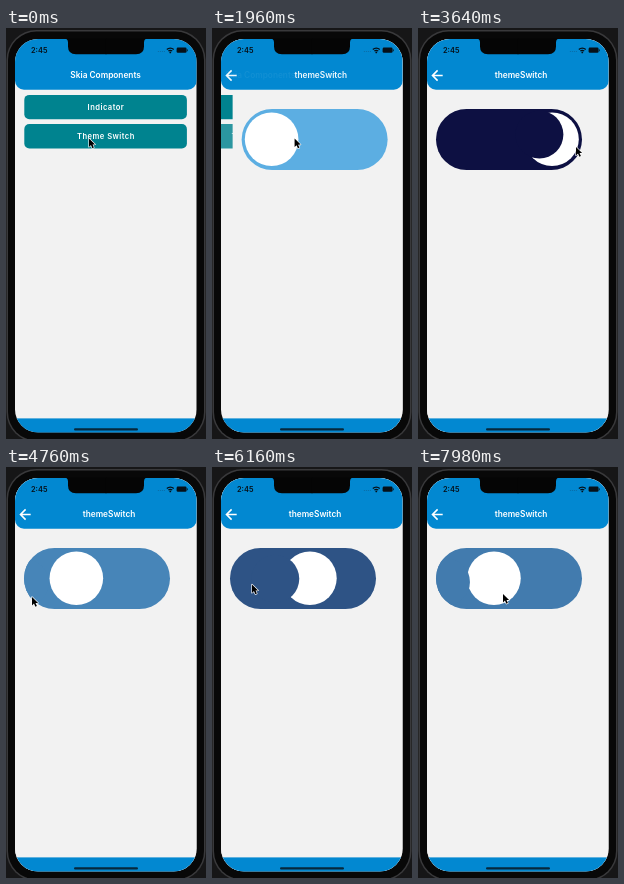
Write an HTML page with a canvas that moves like this. It is 200 by 411 pixels and loops after 8000 ms.

```html
<!DOCTYPE html>
<html lang="en">
<head>
<meta charset="utf-8">
<title>Theme switch</title>
<style>
html, body { margin: 0; width: 100%; height: 100%; overflow: hidden; background: #161617; }
canvas { display: block; width: 200px; height: 411px; }
</style>
</head>
<body>
<canvas id="stage"></canvas>
<script>
const W = 200, H = 411, LOOP = 8000, STEP = 140, GLIDE = 800;
const BLUE = '#0288d1', TEAL = '#00838f', PAGE = '#f2f2f2', INK = '#061018';
const FONT = 'Inter, "Liberation Sans", sans-serif';
const screen = { x: 9, y: 11, w: 181.7, h: 393.5, r: 23 };
const track = { x: 18, y: 81, w: 146, h: 61 };
const thumb = { left: 48, right: 134, y: 111.2, r: 26.8 };

// Times at which the switch is flipped, and pointer moves as [start, dx, dy]
const flips = [2222, 4227, 5717, 7485];
const moves = [[1800, -4, 0.5], [2700, 79, 8], [3780, -132, 11], [5300, 14, -12.5], [6900, 45, 9.5]];

const canvas = document.getElementById('stage');
const ctx = canvas.getContext('2d');
const dpr = window.devicePixelRatio || 1;
canvas.width = W * dpr;
canvas.height = H * dpr;

const clamp01 = v => Math.min(1, Math.max(0, v));

function glide(t, start) {
  const p = clamp01((t - start) / GLIDE);
  return p * p * (3 - 2 * p);
}

function thumbX(t) {
  const p = flips.reduce((sum, start, i) => sum + (i % 2 ? -1 : 1) * glide(t, start), 0);
  return thumb.left + (thumb.right - thumb.left) * p;
}

function pointerAt(t) {
  return moves.reduce(([x, y], [start, dx, dy]) => {
    const p = glide(t, start);
    return [x + dx * p, y + dy * p];
  }, [83, 110.5]);
}

const pressAlpha = t => 1 - 0.5 * Math.sin(Math.PI * clamp01((t - 1340) / 700));

function trackColor(x) {
  const d = thumb.right - x;
  return `rgb(${13 + 0.913 * d},${16 + 1.843 * d},${66 + 1.858 * d})`;
}

function box(x, y, w, h, r, fill) {
  ctx.beginPath();
  ctx.roundRect(x, y, w, h, r);
  ctx.fillStyle = fill;
  ctx.fill();
}

function disc(x, y, r, fill) {
  ctx.beginPath();
  ctx.arc(x, y, r, 0, Math.PI * 2);
  ctx.fillStyle = fill;
  ctx.fill();
}

function clipBox(x, y, w, h, r) {
  ctx.beginPath();
  ctx.roundRect(x, y, w, h, r);
  ctx.clip();
}

function label(text, x, y, size, color, spacing = 0) {
  ctx.font = `600 ${size}px ${FONT}`;
  ctx.letterSpacing = spacing + 'px';
  ctx.textAlign = 'center';
  ctx.fillStyle = color;
  ctx.fillText(text, x + spacing / 2, y);
}

function button(text, y, alpha) {
  ctx.globalAlpha = alpha;
  box(18.3, y, 162.6, 24.3, 5, TEAL);
  label(text, 99.7, y + 15, 7.6, '#fff', 0.45);
  ctx.globalAlpha = 1;
}

function themeSwitch(x) {
  const { x: tx, y: ty, w, h } = track;
  const color = trackColor(x), d = x - 76;
  box(tx, ty, w, h, h / 2, color);
  ctx.save();
  clipBox(tx, ty, w, h, h / 2);
  disc(x, thumb.y, thumb.r, '#fff');
  // The shadow disc slides in over the thumb to carve the crescent
  disc(28 + 1.61 * d, 115 - 0.145 * d, 24, color);
  ctx.restore();
}

function backArrow(x, y, size) {
  ctx.strokeStyle = '#fff';
  ctx.lineWidth = 1.6;
  ctx.beginPath();
  ctx.moveTo(x + 2 * size, y);
  ctx.lineTo(x, y);
  ctx.moveTo(x + size, y - size);
  ctx.lineTo(x, y);
  ctx.lineTo(x + size, y + size);
  ctx.stroke();
}

function phone() {
  ctx.fillStyle = '#161617';
  ctx.fillRect(0, 0, W, H);
  box(0.5, 2, 199, 412, 30, '#39393b');
  box(2, 3.5, 196, 409, 28.5, '#080808');
}

function notch() {
  ctx.fillStyle = '#050505';
  for (const side of [-1, 1]) {
    ctx.save();
    ctx.translate(100, 10.5);
    ctx.scale(side, 1);
    ctx.beginPath();
    ctx.moveTo(-0.5, 0);
    ctx.lineTo(42, 0);
    ctx.quadraticCurveTo(38, 0, 38, 4);
    ctx.lineTo(38, 8);
    ctx.quadraticCurveTo(38, 15.7, 30, 15.7);
    ctx.lineTo(-0.5, 15.7);
    ctx.fill();
    ctx.restore();
  }
}

function statusBar() {
  label('2:45', 33.2, 25, 7.4, INK);
  for (let i = 0; i < 4; i++) disc(152.3 + i * 2, 23.5, 0.5, '#0b6599');
  ctx.strokeStyle = INK;
  ctx.lineWidth = 1.3;
  for (const r of [2.7, 4.9]) {
    ctx.beginPath();
    ctx.arc(164.3, 25, r, Math.PI * 1.25, Math.PI * 1.75);
    ctx.stroke();
  }
  disc(164.3, 24.4, 0.9, INK);
  box(170.6, 19.6, 10, 5.2, 1.3, INK);
  box(181, 21.3, 0.7, 1.9, 0.3, INK);
}

function pointer(x, y) {
  ctx.save();
  ctx.translate(x, y);
  ctx.scale(0.86, 0.86);
  ctx.beginPath();
  [[0, 0], [0, 9.8], [2.3, 7.7], [3.9, 11.4], [5.7, 10.6], [4.1, 7.1], [7.1, 7]]
    .forEach(([px, py]) => ctx.lineTo(px, py));
  ctx.closePath();
  ctx.lineJoin = 'round';
  ctx.lineWidth = 1.4;
  ctx.strokeStyle = '#fff';
  ctx.stroke();
  ctx.fillStyle = '#000';
  ctx.fill();
  ctx.restore();
}

function pages(t, slide) {
  const { x, y, w, h } = screen;
  ctx.fillStyle = PAGE;
  ctx.fillRect(x, y, w, h);
  if (slide < 1) {
    ctx.save();
    ctx.translate(-55 * slide, 0);
    button('Indicator', 66.9, 1);
    button('Theme Switch', 96.1, pressAlpha(t));
    ctx.restore();
  }
  if (slide > 0) {
    ctx.save();
    ctx.translate(w * (1 - slide), 0);
    ctx.fillStyle = PAGE;
    ctx.fillRect(x, y, w, h);
    themeSwitch(thumbX(t));
    ctx.restore();
  }
}

function header(slide) {
  box(screen.x, 0, screen.w, 61.7, 9, BLUE);
  ctx.globalAlpha = 1 - slide;
  label('Skia Components', 99.6 - 55 * slide, 50.4, 8.3, '#fff');
  ctx.globalAlpha = slide;
  label('themeSwitch', 103 + 90 * (1 - slide), 50.4, 8.3, '#fff');
  backArrow(14.5, 47.5, 5.1);
  ctx.globalAlpha = 1;
}

function draw(t) {
  const slide = 1 - Math.pow(1 - clamp01((t - 1540) / 700), 3);
  ctx.setTransform(dpr, 0, 0, dpr, 0, 0);
  phone();
  ctx.save();
  clipBox(screen.x, screen.y, screen.w, screen.h, screen.r);
  pages(t, slide);
  header(slide);
  ctx.fillStyle = BLUE;
  ctx.fillRect(screen.x, 390.4, screen.w, 20);
  box(68, 400.3, 64, 2.2, 1.1, '#06283d');
  statusBar();
  ctx.restore();
  notch();
  pointer(...pointerAt(t));
}

const start = performance.now();
function tick() {
  const t = (performance.now() - start) % LOOP;
  draw(Math.floor(t / STEP) * STEP);
  requestAnimationFrame(tick);
}
tick();
</script>
</body>
</html>
```
